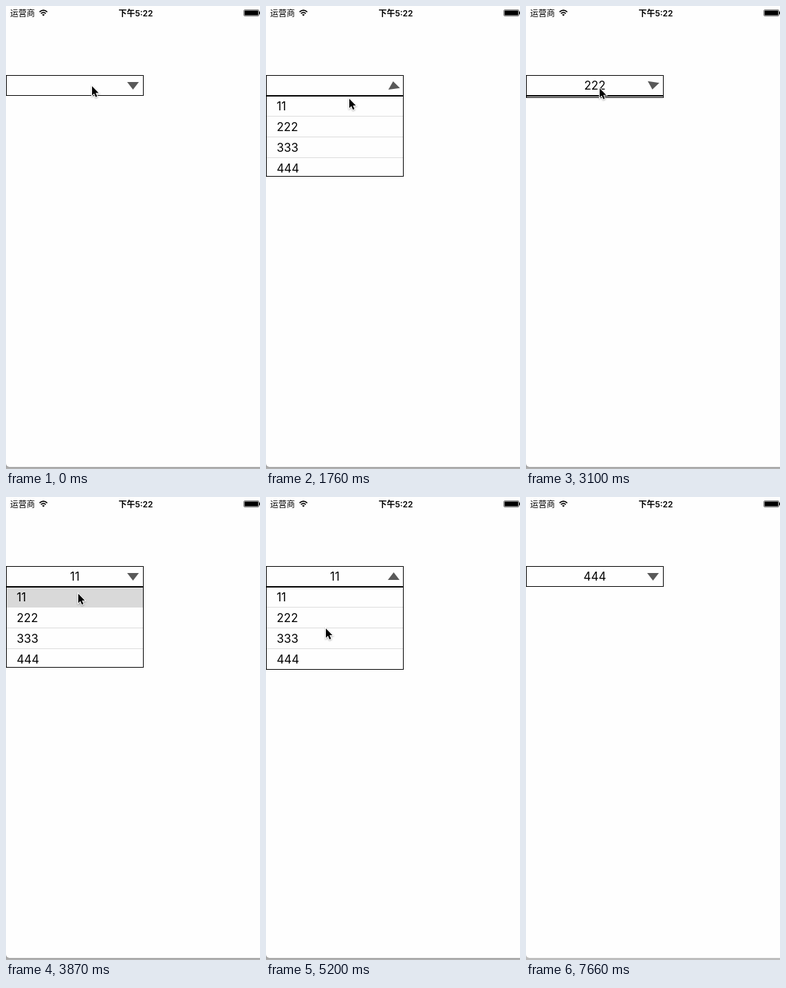
Write an HTML page that moves like this. It is 369x670 px and loops after 7.76 s.

```html
<!DOCTYPE html>
<html>
<head>
<meta charset="utf-8">
<style>
  html, body { margin: 0; width: 100%; height: 100%; overflow: hidden; background: #999; }
  svg { display: block; }
  text { font: 17px Inter, "Liberation Sans", sans-serif; }
  .bar { font: 12px Inter, "Noto Sans CJK SC", "Noto Sans CJK", sans-serif; }
  .box { fill: none; stroke: #000; }
  #cursor { filter: drop-shadow(0 1px 1px #0005); }
</style>
</head>
<body>
<svg width="369" height="670">
  <defs>
    <linearGradient id="shade" x2="0" y2="1">
      <stop stop-color="#858585"/><stop offset="1" stop-color="#b2b2b2"/>
    </linearGradient>
  </defs>
  <rect id="edge" y="660" width="369" height="10" fill="url(#shade)"/>
  <rect y="-20" width="373" height="687" rx="5" fill="#fefefe"/>

  <text class="bar" x="6" y="14.5">运营商</text>
  <g fill="none" stroke="#000" stroke-width="1.7">
    <path d="M48.7 8.6Q54.3 3.6 59.9 8.6M50.8 10.9Q54.3 7.8 57.8 10.9"/>
    <path d="M54.3 14.6l-2-2.2q2-1.5 4 0z" fill="#000" stroke="none"/>
  </g>
  <text class="bar" x="188.5" y="14.5" text-anchor="middle" style="font-weight:600">下午5:22</text>
  <rect x="345.5" y="5.5" width="22" height="9" rx="1.5" fill="none" stroke="#777"/>
  <rect x="346.5" y="6.5" width="20" height="7" rx=".5"/>
  <rect x="368" y="8" width="2" height="4"/>

  <svg id="list" y="130" width="200" height="0">
    <g id="rows"></g>
    <rect id="frame" class="box" x=".5" y=".5" width="199"/>
  </svg>
  <rect class="box" x=".5" y="100.5" width="199" height="29"/>
  <text id="value" x="100" y="121.3" text-anchor="middle"></text>
  <path id="arrow" d="M-9-5H8L-.5 6z" fill="#595959"/>
  <path id="cursor" d="M1 1v13.4l3-2.9 2.3 5.2 2.2-1-2.2-5h4.2z"
        stroke="#fff" stroke-width="2" paint-order="stroke"/>
</svg>
<script>
const LOOP = 7760, DURATION = 250, LEAD = 25;
const items = ['11', '222', '333', '444'];

// Clicks open and close the list in turn: [time, chosen row]
const clicks = [[180], [820], [1560], [2290, 1], [3100], [3870, 0], [4920], [5780, 3]];

// Pointer moves: [start, x, y, length]
const moves = [
  [1616, 112, 170], [2310, 106, 118], [3200, 104, 139], [3870, 116, 104],
  [4976, 71, 232], [6000, 97, 105], [6470, 194, 473, 80], [6600, 330, 674, 730]
];

const $ = id => document.getElementById(id);
const set = (id, name, value) => $(id).setAttribute(name, value);
const clamp = x => Math.max(0, Math.min(1, x));
const ease = x => (1 - Math.cos(Math.PI * clamp(x))) / 2;

$('rows').innerHTML = items.map((s, i) =>
  `<rect id="row${i}" y="${i * 30}" width="200" height="30"/>
   <path d="M0 ${i * 30 + 29.5}h200" stroke="#dcdcdc"/>
   <text x="15.4" y="${i * 30 + 20.8}">${s}</text>`).join('');

function pointer(t) {
  let x = 124, y = 115;
  for (const [start, toX, toY, length = 370] of moves) {
    const k = ease((t - start) / length);
    x += (toX - x) * k;
    y += (toY - y) * k;
  }
  return [x, y];
}

function draw(t) {
  const past = clicks.filter(c => c[0] <= t);
  const [start, row] = past.at(-1) || [-LOOP];
  const x = clamp((t - start + LEAD) / DURATION);
  const level = p => past.length % 2 ? p : 1 - p;

  const height = Math.round(120 * level(ease(x)));
  set('list', 'height', height);
  set('frame', 'height', Math.max(0, height - 1));
  items.forEach((_, i) => set('row' + i, 'fill', i === row ? '#d9d9d9' : '#fefefe'));

  const pick = past.filter(c => c.length > 1).at(-1);
  $('value').textContent = pick ? items[pick[1]] : '';

  // Choosing a row resets the arrow at once
  const turn = row === undefined ? 180 * level(.7 * ease(x) + .3 * x) : 0;
  set('arrow', 'transform', `translate(185 115) rotate(${turn})`);
  set('cursor', 'transform', `translate(${pointer(t)})`);
  set('edge', 'fill', t < 7660 ? 'url(#shade)' : '#bdbdbd');
}

const begin = performance.now();
function tick() {
  draw((performance.now() - begin) % LOOP);
  requestAnimationFrame(tick);
}
tick();
</script>
</body>
</html>
```
